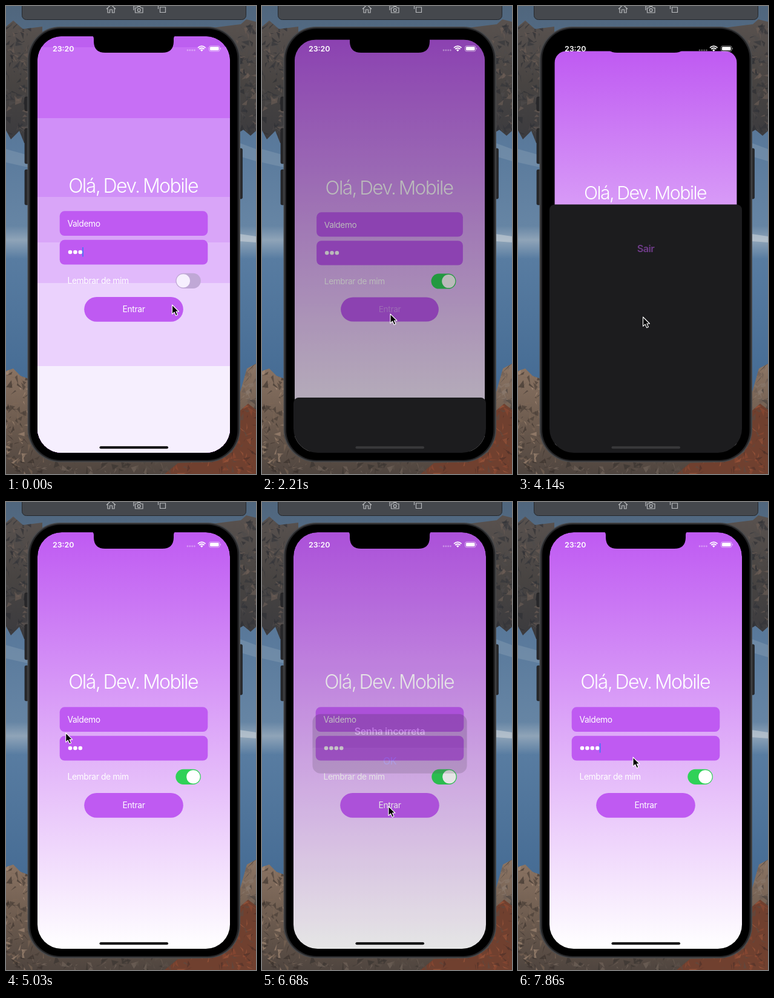
Recreate the animation shown at these times as an HTML page. Size 413 by 772 pixels, loop 8000 ms.

```html
<!DOCTYPE html>
<html lang="pt">
<head>
<meta charset="utf-8">
<title>Login</title>
<style>
  html, body { margin: 0; width: 100%; height: 100%; overflow: hidden; background: #4d6c8e; }
  svg { display: block; width: 413px; height: 772px; }
  text { font-family: Inter, Roboto, sans-serif; fill: #fff; }
  .body { font-size: 13.8px; letter-spacing: -.36px; }
  .title { font-size: 32px; font-weight: 300; letter-spacing: -1.6px; word-spacing: -2px; }
  .welcome { font-size: 40.7px; font-weight: 600; letter-spacing: -1.3px; }
  .mid { text-anchor: middle; }
  .accent { fill: #bf5af2; }
</style>
</head>
<body>
<svg viewBox="0 0 413 772">
  <defs>
    <linearGradient id="water" x2="0" y2="1">
      <stop offset="0" stop-color="#50667d"/><stop offset=".3" stop-color="#5a7a9c"/>
      <stop offset=".47" stop-color="#6685a4"/><stop offset=".5" stop-color="#8fa4b8"/>
      <stop offset=".54" stop-color="#587ca1"/><stop offset=".8" stop-color="#466c94"/>
    </linearGradient>
    <linearGradient id="cliff" x2="0" y2="1">
      <stop offset="0" stop-color="#59524f"/><stop offset=".5" stop-color="#484442"/>
      <stop offset="1" stop-color="#3a3a3e"/>
    </linearGradient>
    <linearGradient id="stone" x2="0" y2="1">
      <stop offset="0" stop-color="#8c7564"/><stop offset=".5" stop-color="#6f5d50"/>
      <stop offset="1" stop-color="#4f453f"/>
    </linearGradient>
    <linearGradient id="smooth" x2="0" y2="1">
      <stop offset="0" stop-color="#bf5af2"/><stop offset="1" stop-color="#fff"/>
    </linearGradient>
    <linearGradient id="alertFill" x2="0" y2="1">
      <stop offset="0" stop-color="#412c4b"/><stop offset=".57" stop-color="#402f49"/>
      <stop offset=".57" stop-color="#594a60"/><stop offset="1" stop-color="#5e5064"/>
    </linearGradient>
    <linearGradient id="skin" x2=".3" y2="1">
      <stop offset="0" stop-color="#fbe6d6"/><stop offset=".6" stop-color="#f5d7c0"/>
      <stop offset="1" stop-color="#dba983"/>
    </linearGradient>
    <path id="cliffShape" d="M0 34L12 24 28 38 60 34V230L30 226 22 206 8 220 0 205ZM340 36L388 30 397 22 413 26V206L404 214 392 204 380 212Z"/>
    <path id="stoneShape" d="M0 602L12 598 24 610 40 616 70 700 130 745 210 750 300 748 386 640 398 598 413 590V772H0Z"/>
    <path id="rustShape" d="M386 668L400 656 413 666V772H262L284 754 340 752 374 736Z"/>
    <clipPath id="cliffClip"><use href="#cliffShape"/></clipPath>
    <clipPath id="stoneClip"><use href="#stoneShape"/></clipPath>
    <clipPath id="rustClip"><use href="#rustShape"/></clipPath>
    <clipPath id="screenClip"><rect x="52" y="50" width="318" height="687" rx="40"/></clipPath>
    <clipPath id="loginClip"><rect id="loginShape" x="52" y="50" width="318" height="700"/></clipPath>
    <clipPath id="sheetClip"><rect x="52" y="97" width="318" height="720" rx="9"/></clipPath>
  </defs>

  <!-- wallpaper -->
  <rect width="413" height="772" fill="url(#water)"/>
  <use href="#cliffShape" fill="url(#cliff)"/>
  <g id="cliffFacets" clip-path="url(#cliffClip)"></g>
  <path fill="#8199b1" opacity=".5" d="M0 236L36 246V266L0 258ZM386 226L413 236V256L386 248Z"/>
  <path fill="#c8d0d7" opacity=".6" d="M386 376L413 380V390L386 388Z"/>
  <use href="#stoneShape" fill="url(#stone)"/>
  <g id="stoneFacets" clip-path="url(#stoneClip)"></g>
  <use href="#rustShape" fill="#70402f"/>
  <g id="rustFacets" clip-path="url(#rustClip)"></g>

  <!-- simulator toolbar -->
  <rect x="26.500" y="-20" width="370" height="42.500" rx="7" fill="#45484d" stroke="#24282d"/>
  <g fill="none" stroke="#b9bbbe" stroke-width="1.200">
    <path d="M166 5L173.500 -2 181 5M168 4V11H171.500V6H175.500V11H179V4"/>
    <path d="M211 7V0H222M213.500 3H216.500L218 1H221.500L223 3H226V11H213.500Z"/>
    <circle cx="219.700" cy="6.700" r="2.400"/>
    <path d="M254.500 2H263.500V10.500H254.500ZM251.500 5V-1H260"/>
  </g>

  <!-- phone -->
  <g fill="#29292b" stroke="#171718" stroke-width=".6">
    <rect x="31" y="150" width="8" height="23" rx="2"/>
    <rect x="31" y="202" width="8" height="58" rx="2"/>
    <rect x="31" y="270" width="8" height="58" rx="2"/>
    <rect x="383" y="235" width="7.500" height="83" rx="2"/>
  </g>
  <rect x="35.500" y="34" width="351.500" height="718.500" rx="54" fill="#48494b"/>
  <rect x="37.300" y="35.500" width="348" height="715.500" rx="52.500" fill="#252527"/>
  <rect x="40" y="37.500" width="342.500" height="711.500" rx="50" fill="#000"/>

  <g clip-path="url(#screenClip)">
    <rect x="52" y="50" width="318" height="687"/>
    <g id="login">
      <g clip-path="url(#loginClip)">
        <rect x="52" y="50" width="318" height="687" fill="url(#smooth)"/>
        <g id="bands"></g>
        <text class="title mid" x="210" y="308.200">Olá, Dev. Mobile</text>
        <g class="accent">
          <rect x="88.700" y="338.300" width="244.600" height="40.700" rx="8"/>
          <rect x="88.700" y="385.800" width="244.600" height="40.700" rx="8"/>
          <rect x="129.200" y="480" width="163.600" height="40.700" rx="20.350"/>
        </g>
        <text class="body" x="101.500" y="364">Valdemo</text>
        <g id="dots" fill="#fff"></g>
        <rect id="caret" y="398" width="1.600" height="15.500" fill="#3b78f7"/>
        <text class="body" x="101.500" y="458.300">Lembrar de mim</text>
        <rect id="track" x="280.300" y="440.700" width="41.500" height="25.300" rx="12.650"/>
        <circle id="knob" cy="453.350" r="11.200" fill="#fff"/>
        <text id="enter" class="body mid" x="211" y="505.300">Entrar</text>
        <rect id="backDim" x="52" y="50" width="318" height="687" opacity=".27"/>
      </g>
    </g>

    <g id="sheet"><g clip-path="url(#sheetClip)">
      <rect x="52" y="97" width="318" height="720" fill="#1c1c1e"/>
      <g id="sheetContent">
        <g>
          <text class="welcome" x="59" y="253">BEM</text>
          <text class="welcome" x="59" y="301.700">VINDO(A),</text>
          <text class="welcome" x="59" y="350.300">VALDEMO</text>
        </g>
        <rect class="accent" x="82" y="386" width="163" height="8.300"/>
        <g fill="url(#skin)" stroke="#d9ab88" stroke-width=".8">
          <path d="M282 296Q284 279 298 277Q306 270 316 273Q326 270 334 276Q345 277 351 290Q357 300 355 317Q353 333 342 335Q325 337 315 330Q292 328 284 318Z"/>
          <rect x="281" y="287" width="17" height="35" rx="8"/>
          <rect x="296" y="285" width="18" height="41" rx="8.500"/>
          <rect x="312" y="285" width="18" height="42" rx="8.500"/>
          <rect x="328" y="287" width="16" height="36" rx="8"/>
          <path d="M354 301Q346 313 334 314Q320 315 315 322Q313 332 324 334Q340 337 349 331Q357 322 354 301Z"/>
        </g>
        <text id="leave" class="mid accent" x="211" y="524.300" font-size="16.300" font-weight="600" letter-spacing="-.5">Sair</text>
      </g>
    </g></g>

    <rect id="alertDim" x="52" y="50" width="318" height="687"/>
    <g id="alert">
      <rect x="101" y="356.500" width="220" height="84.500" rx="11.500" fill="url(#alertFill)"/>
      <path d="M101 405H321" stroke="#6d6072" stroke-width=".6"/>
      <text class="body mid" x="211" y="385.700" font-weight="600">Senha incorreta</text>
      <text class="body mid" x="211" y="428.500" style="fill:#4389ee">OK</text>
    </g>

    <g fill="#fff">
      <text x="77" y="74.700" font-size="12.400" font-weight="600">23:20</text>
      <g opacity=".35">
        <circle cx="300" cy="73" r="1.400"/><circle cx="303.800" cy="73" r="1.400"/>
        <circle cx="307.600" cy="73" r="1.400"/><circle cx="311.400" cy="73" r="1.400"/>
      </g>
      <path d="M321 72.500Q323.300 70.700 325.600 72.500L323.300 75Z"/>
      <path fill="none" stroke="#fff" stroke-width="1.700" d="M317 68.800Q323.300 63.500 329.600 68.800M319.100 71Q323.300 67.500 327.500 71"/>
      <rect x="335.500" y="65.800" width="17.500" height="9" rx="2.600" fill="none" stroke="#fff" stroke-opacity=".5"/>
      <rect x="337" y="67.300" width="14.500" height="6" rx="1.400"/>
      <path d="M354 68.800Q356 70.300 354 71.800Z" opacity=".6"/>
    </g>
    <rect id="indicator" x="154.500" y="726.300" width="113.500" height="4" rx="2"/>
  </g>
  <path d="M141 49Q145 49.500 145 54V59Q145.500 77 164 77H258Q276.500 77 277 59V54Q277 49.500 281 49Z"/>

  <path id="cursor" d="M0 0V15.300L3.600 12 6.200 17.700 8.900 16.500 6.400 11H11Z" fill="#000" stroke="#fff" stroke-width="1.100" stroke-linejoin="round"/>
</svg>

<script>
const LOOP = 8000, STEP = 148.2;
const DROP = 640;
const PRESENT = 2191.5, DISMISS = 4089.5;
const $ = id => document.getElementById(id);
const clamp = v => Math.min(1, Math.max(0, v));
const ramp = (t, start, length) => {
  const u = clamp((t - start) / length);
  return u * u * (3 - 2 * u);
};
const between = (t, a, b) => t >= a && t < b;
const set = (id, attrs) => {
  for (const name in attrs) $(id).setAttribute(name, attrs[name]);
};
const show = (id, on) => set(id, { visibility: on ? 'visible' : 'hidden' });

// Critically damped spring, 0 to 1
const spring = ms => {
  const x = Math.max(0, ms) * 0.021;
  return 1 - (1 + x) * Math.exp(-x);
};

// Rock texture: small seeded triangles
let seed = 7;
const random = () => (seed = seed * 16807 % 2147483647) / 2147483647;
function addFacets(id, [left, top, width, height], colors, count) {
  let html = '';
  for (let i = 0; i < count; i++) {
    const x = left + random() * width, y = top + random() * height;
    const near = () => `${x + random() * 16 - 8} ${y + random() * 16 - 8}`;
    html += `<path d="M${near()}L${near()} ${near()}Z" fill="${colors[i % colors.length]}" opacity=".6"/>`;
  }
  $(id).innerHTML += html;
}
for (const left of [0, 386])
  addFacets('cliffFacets', [left, 25, 36, 200], ['#6f6058', '#33343a', '#4f4c4c', '#2c2d32'], 130);
addFacets('stoneFacets', [0, 595, 60, 177], ['#a98e79', '#453b35', '#7d6857', '#372f2b'], 160);
addFacets('stoneFacets', [384, 590, 29, 80], ['#8a7a6e', '#45403d', '#6b5d54'], 50);
addFacets('stoneFacets', [60, 745, 220, 27], ['#75675d', '#38332f', '#5b5049'], 80);
addFacets('rustFacets', [262, 656, 151, 116], ['#8f4a33', '#4b2f28', '#a2593d', '#5d4a42'], 200);

// Time, x, y of the pointer tip
const pointer = [
  [0, 274.5, 493], [300, 282, 505], [750, 296, 455], [1190, 295, 455],
  [1480, 226, 490], [1920, 226, 490], [2090, 212, 508], [2225, 212, 508],
  [2660, 243.5, 334], [3110, 243.5, 334], [3410, 47, 345], [3700, 140, 570],
  [3900, 206.5, 513], [4450, 206.5, 513], [4900, 110, 390], [5330, 64, 353],
  [5480, 191, 396], [6050, 191, 396], [6400, 209, 502], [6900, 209, 502],
  [7260, 213, 436], [7560, 213, 436], [7850, 190, 421]
];

function pointerAt(t) {
  const next = pointer.findIndex(p => p[0] > t);
  if (next < 0) return pointer[pointer.length - 1].slice(1);
  const a = pointer[next - 1], b = pointer[next];
  const u = ramp(t, a[0], b[0] - a[0]);
  return [a[1] + (b[1] - a[1]) * u, a[2] + (b[2] - a[2]) * u];
}

const bands = [
  [50, '#bd5ff0'], [68, '#c76ff5'], [185, '#d08ff8'], [315, '#d9a5f8'],
  [390, '#e1b9fb'], [457, '#ebd2fd'], [594, '#f6effe']
];
$('bands').innerHTML = bands.map(([y, color]) =>
  `<rect x="52" y="${y}" width="318" height="${737 - y}" fill="${color}"/>`).join('');
$('dots').innerHTML = [0, 1, 2, 3].map(i =>
  `<circle cx="${106 + i * 8.4}" cy="406" r="3.3"/>`).join('');

function draw(t) {
  const dismissing = t >= DISMISS;
  const open = dismissing ? 1 - spring(t - DISMISS) : spring(t - PRESENT);
  const scale = 1 - 0.082 * open;
  const drop = DROP * (1 - open);

  show('bands', t < 2065);
  set('login', {
    transform: `translate(211 ${50 + 38 * open}) scale(${scale}) translate(-211 -50)`
  });
  set('loginShape', { rx: 40 - 30 * open });
  show('backDim', between(t, 2065, DISMISS));
  set('sheet', { transform: `translate(0 ${drop})` });
  set('sheetContent', { transform: `translate(0 ${dismissing ? -1.513 * drop : 0})` });
  set('leave', { opacity: between(t, 3950, 4500) ? 0.5 : 1 });

  const on = ramp(t, 850, 220);
  set('track', { fill: on > 0.3 ? '#30d158' : '#c0a8d6' });
  set('knob', { cx: 292.8 + 16.6 * on, fill: on > 0.3 ? '#fff' : '#f6effe' });

  const typed = t > 6000 ? 4 : 3;
  [...$('dots').children].forEach((dot, i) =>
    dot.setAttribute('visibility', i < typed ? 'visible' : 'hidden'));
  const blink = (t + 100) % 1000 < 550;
  const focused = t < 1900 || between(t, 5700, 6400);
  set('caret', { x: typed === 4 ? 134.8 : 126.2 });
  show('caret', (focused && blink) || t > 7700);
  const pressed = between(t, 1900, 2400) || between(t, 6450, 6650);
  set('enter', { opacity: pressed ? 0.35 : 1 });

  const alert = ramp(t, 6600, 230) * (1 - ramp(t, 7530, 260));
  const grow = t < 7500 ? 1.18 - 0.18 * ramp(t, 6600, 330) : 1;
  set('alertDim', { opacity: 0.48 * alert });
  set('alert', {
    opacity: alert,
    transform: `translate(211 398.7) scale(${grow}) translate(-211 -398.7)`
  });

  set('indicator', { fill: drop < 628 ? '#38383a' : '#000' });
  set('cursor', { transform: `translate(${pointerAt(t).join(' ')})` });
}

function frame() {
  const t = performance.now() % LOOP;
  draw(Math.min(53, Math.floor((t + 15) / STEP)) * STEP);
  requestAnimationFrame(frame);
}
frame();
</script>
</body>
</html>
```
